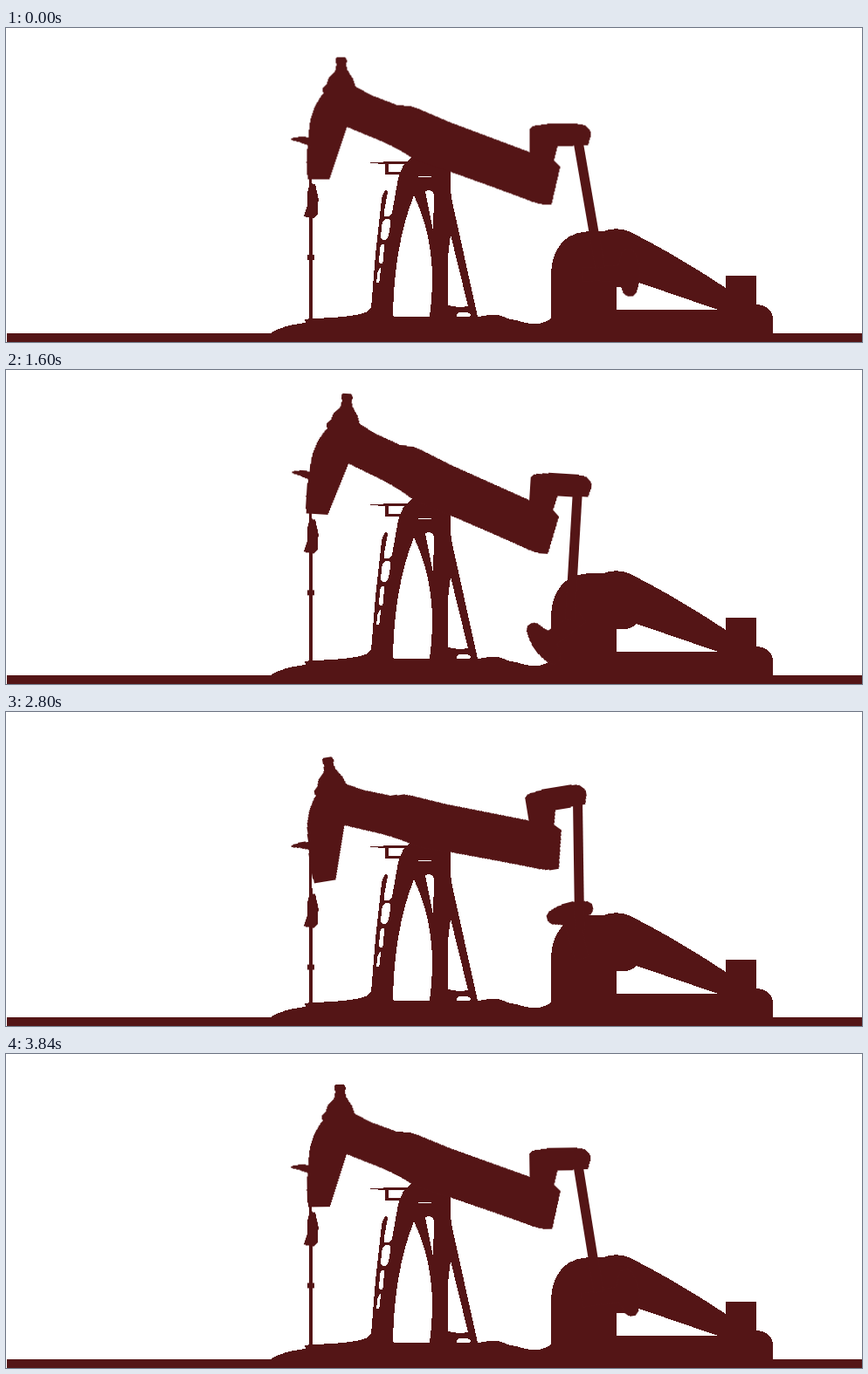
Recreate the animation shown at these times as an HTML page. Size 980 by 360 pixels, loop 3920 ms.

```html
<!DOCTYPE html>
<html lang="en">
<head>
<meta charset="utf-8">
<title>Pump jack</title>
<style>
html, body { margin: 0; width: 100%; height: 100%; overflow: hidden; background: #fff; }
svg { display: block; width: 980px; height: 360px; fill: #541516; shape-rendering: crispEdges; }
.beam, .rod, .lift, .hanger, .crank { animation: 3920ms -1ms infinite; }
.beam { animation-name: rock; transform-origin: 490px 140px; }
.hanger { animation-name: hang; }
.lift { animation-name: lift; }
.rod { animation-name: swing; transform-origin: 654.2px 127px; }
.crank { animation-name: turn; animation-timing-function: steps(49); }

/* 49 poses of 80 ms; turning points after 12, 24 and 36 */
@keyframes rock {
  0% { transform: rotate(0deg); animation-timing-function: steps(12); }
  24.4898% { transform: rotate(10.5deg); animation-timing-function: steps(24); }
  73.4694% { transform: rotate(-10.2deg); animation-timing-function: steps(13); }
  100% { transform: rotate(0deg); }
}
@keyframes hang {
  0% { transform: translateY(0); animation-timing-function: steps(12); }
  24.4898% { transform: translateY(-27.5px); animation-timing-function: steps(24); }
  73.4694% { transform: translateY(32px); animation-timing-function: steps(13); }
  100% { transform: translateY(0); }
}
@keyframes lift {
  0% { transform: translateY(0); animation-timing-function: steps(12); }
  24.4898% { transform: translateY(30px); animation-timing-function: steps(24); }
  73.4694% { transform: translateY(-29.5px); animation-timing-function: steps(13); }
  100% { transform: translateY(0); }
}
@keyframes swing {
  0% { transform: rotate(-9.8deg); animation-timing-function: steps(12); }
  24.4898% { transform: rotate(-.6deg); animation-timing-function: steps(12); }
  48.9796% { transform: rotate(5.4deg); animation-timing-function: steps(12); }
  73.4694% { transform: rotate(-1.4deg); animation-timing-function: steps(13); }
  100% { transform: rotate(-9.8deg); }
}
@keyframes turn {
  from { transform: translate(659.5px, 282.5px) rotate(88deg); }
  to { transform: translate(659.5px, 282.5px) rotate(448deg); }
}
</style>
</head>
<body>
<svg viewBox="0 0 980 360">
  <!-- ground and mound -->
  <path d="M1 350H303Q316 341 343 338L342 334 350 333Q395 332 412 326L419 319 445 331H541L550 329.500Q562 327.500 570 331Q575 334 585 335Q598 340 610 339Q620 337 626 331V350H980V360H1Z"/>

  <!-- engine housing -->
  <path fill-rule="evenodd" d="M624 350V285C624 255 638 235 664 233.500L684 233Q700 227 716 234.500Q770 262 824 298V284H859V317Q877 318 878 334V350Z M699 297Q714 299 722 291L815 323H699Z"/>

  <path class="crank" d="M-8 0L-9-41Q-16-45-22-46Q-32-53-24-61Q0-71 24-61Q32-53 22-46Q16-45 9-41L8 0Z"/>
  <g class="lift"><rect class="rod" x="648.7" y="127" width="11" height="150"/></g>

  <!-- tower -->
  <path fill-rule="evenodd" d="M466 146L455 157 449 172 442 212Q439 218 433 216L433 210 437 188 435 186Q431 188 430 197L423 260 418 321 412 331H443Q444 250 467 192Q496 252 485 331H540L511 200 509 186V146Z
    M440 220Q431 216 430 228L429 240Q431 245 436 242Q440 235 440 220Z
    M433 248Q428 246 428 255L427 268Q430 273 432 267Z
    M429 275Q425 277 425 285L424 292Q427 294 428 288Z
    M480 187Q489 184 490 192L489 232Z
    M509 237L506 262V318Q518 321 529 319Z
    M516 329Q517 325 524 326Q532 326 532 329Q531 333 524 332.500Q516 333 516 329Z
    M472 169.500H487V171H472Z"/>
  <path d="M417 154H428L436 153H459V156H438V164.500H453V167.500H434V156L417 155Z"/>

  <!-- polished rod -->
  <rect x="347" y="142" width="3" height="60"/>
  <rect x="347" y="202" width="4" height="133"/>
  <g class="hanger">
    <path d="M348 178L354 179 356.500 190 358 197 357 201V214L352 218.500 341 216 344.500 205V190Z"/>
    <rect x="345" y="260" width="8" height="6"/>
  </g>

  <!-- walking beam, horse head and tail -->
  <g transform="translate(-.5 -.5)">
    <path class="beam" d="M379 34H389Q392 37 390 42L391 48 398 59 401 68 420 78 450 89.500Q462 89 470 92L510 109 600.500 143 599.500 119Q600 114 606 112.500Q630 108 655 110.500Q668 111 670.500 122L667 135 632 136 628 152 635 160 625 203Q612 204 596 197Q556 182 511 166L475 154 463 148Q452 140 432 131L391 114 371 173.500H346Q343 155 346 135Q337 131 327 129V127Q338 124 347 126Q347 96 364 75Q360 70 368 65Q368 57 377 51L379 42Q376 38 379 34Z"/>
  </g>
</svg>
</body>
</html>
```
